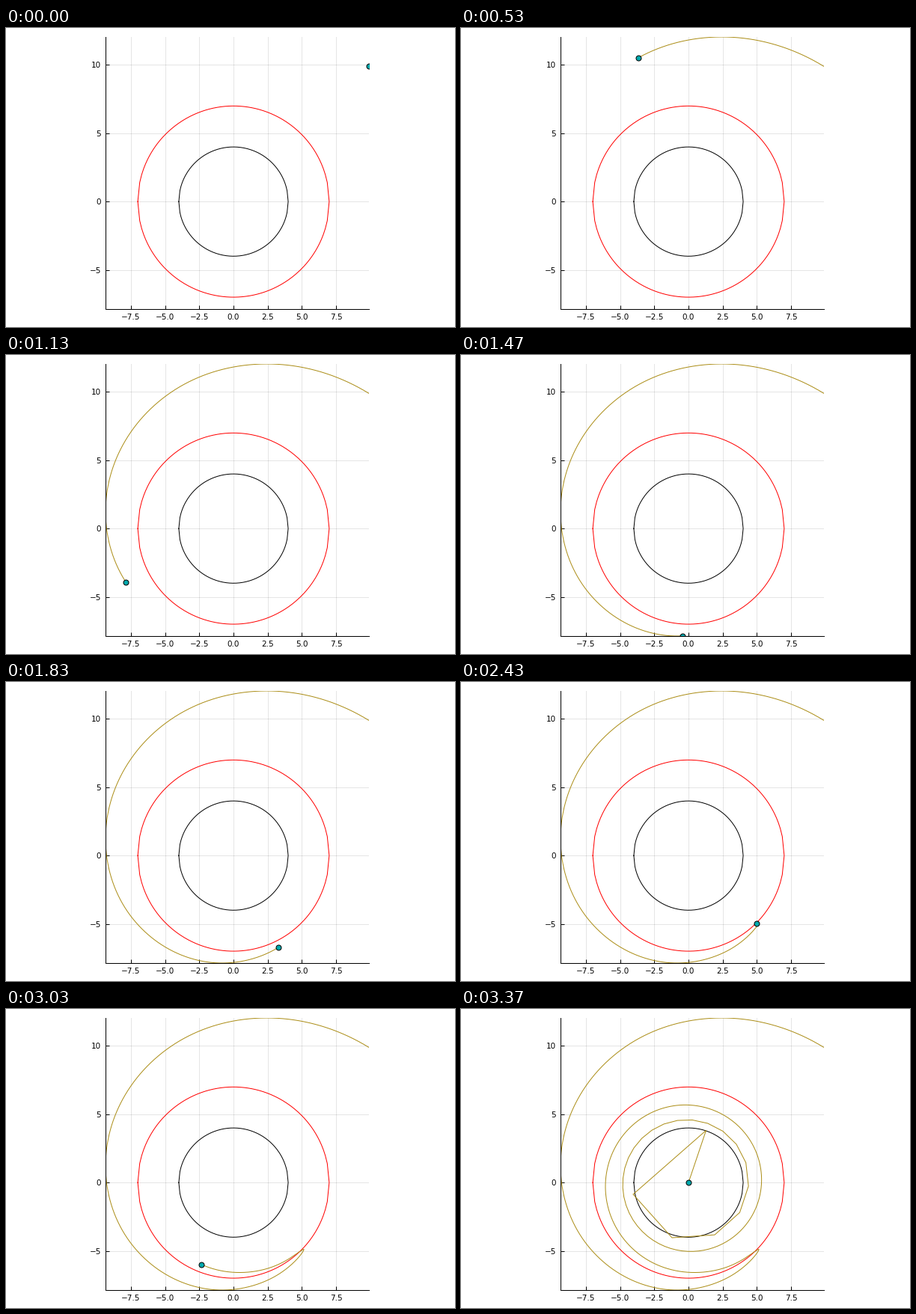
These frames come from a looping animation (600 by 400 pixels, 9530 ms). A matplotlib script:

```python
import numpy as np
import matplotlib.pyplot as plt
from matplotlib.animation import FuncAnimation

W, H, DPI = 600, 400, 100
LOOP_MS, FRAMES = 9530, 286
STRIDE = 35            # path points per frame
PX = 72 / DPI          # one pixel in typographic points
SCALE, X0, Y0 = 18.27, 304, 232.2   # pixels per unit, origin on the stage
LEFT, RIGHT, TOP, BOTTOM = 133, 485, 12, 376
HORIZON, ERGOSPHERE = 4, 7

plt.rcParams["font.family"] = "DejaVu Sans"

# Infall knots: steps left before the horizon, angle in degrees, radius
KNOTS = np.array([
    (3518.65, 45, 14), (3228, 78.5, 12.3), (2958.65, 114.1, 10.99),
    (2567, 172.7, 9.436), (2328.65, 212.4, 8.69), (2000, 264, 7.913),
    (1593.65, 298.6, 7.446), (1138.65, 316.3, 7.116), (963.65, 314.6, 7.02),
    (613.65, 294, 6.79), (473.65, 273.8, 6.6), (333.65, 237.25, 6.377),
    (209, 180, 6.07), (109.7, 90, 5.68), (60.3, 0, 5.34),
    (33.8, -90, 5.04), (19.1, -180, 4.81), (11.65, -260, 4.62),
    (8.65, -303.8, 4.526), (5.65, -363.4, 4.395), (3.65, -423.4, 4.28),
    (2.65, -466.6, 4.215), (1.65, -528, 4.14), (0.65, -648.6, 4.03),
])[::-1]


def hermite(x, xk, yk):
    """Smooth cubic curve through the knots."""
    slope = np.gradient(yk, xk, edge_order=2)
    j = np.clip(np.searchsorted(xk, x) - 1, 0, len(xk) - 2)
    h = xk[j + 1] - xk[j]
    t = (x - xk[j]) / h
    return ((1 + 2 * t) * (1 - t) ** 2 * yk[j]
            + t * (1 - t) ** 2 * h * slope[j]
            + t * t * (3 - 2 * t) * yk[j + 1]
            + t * t * (t - 1) * h * slope[j + 1])


def infall_path():
    left = np.log(np.arange(KNOTS[-1, 0], 0, -1))
    uk = np.log(KNOTS[:, 0])
    phi = np.radians(hermite(left, uk, KNOTS[:, 1]))
    r = hermite(left, uk, KNOTS[:, 2])
    x = np.append(r * np.cos(phi), 0)
    y = np.append(r * np.sin(phi), 0)
    return x, y


def draw_circle(ax, radius, color):
    x = np.linspace(-radius, radius, 100)
    y = np.sqrt(np.maximum(radius ** 2 - x ** 2, 0))
    ax.plot(np.append(x, x[::-1]), np.append(y, -y[::-1]),
            color=color, lw=PX, zorder=2)


fig = plt.figure(figsize=(W / DPI, H / DPI), dpi=DPI, facecolor="white")
ax = fig.add_axes([LEFT / W, 1 - BOTTOM / H,
                   (RIGHT - LEFT) / W, (BOTTOM - TOP) / H])
ax.set_xlim((LEFT - X0) / SCALE, (RIGHT - X0) / SCALE)
ax.set_ylim((Y0 - BOTTOM) / SCALE, (Y0 - TOP) / SCALE)
ax.set_xticks(np.arange(-7.5, 8, 2.5))
ax.set_yticks([-5, 0, 5, 10])
ax.tick_params(direction="in", length=5 * PX, width=PX, labelsize=10.4 * PX)
ax.tick_params(axis="x", pad=6.2 * PX)
ax.tick_params(axis="y", pad=6 * PX)
ax.grid(color="black", alpha=0.1, lw=PX)
ax.set_axisbelow(True)
ax.spines[["top", "right"]].set_visible(False)
for side in ("left", "bottom"):
    ax.spines[side].set(linewidth=PX, zorder=5)

draw_circle(ax, HORIZON, "black")
draw_circle(ax, ERGOSPHERE, "red")
trail, = ax.plot([], [], color="#ac8e18", lw=PX, zorder=3)
dot, = ax.plot([], [], "o", ms=7 * PX, mfc="#00a9ad", mec="black",
               mew=PX, zorder=4)
dot.set_snap(False)

path_x, path_y = infall_path()


def update(frame):
    last = min(frame * STRIDE, len(path_x) - 1)
    trail.set_data(path_x[:last + 1], path_y[:last + 1])
    dot.set_data([path_x[last]], [path_y[last]])
    return trail, dot


anim = FuncAnimation(fig, update, frames=FRAMES, interval=LOOP_MS / FRAMES,
                     repeat=True, repeat_delay=0, cache_frame_data=False)
plt.show()
```
